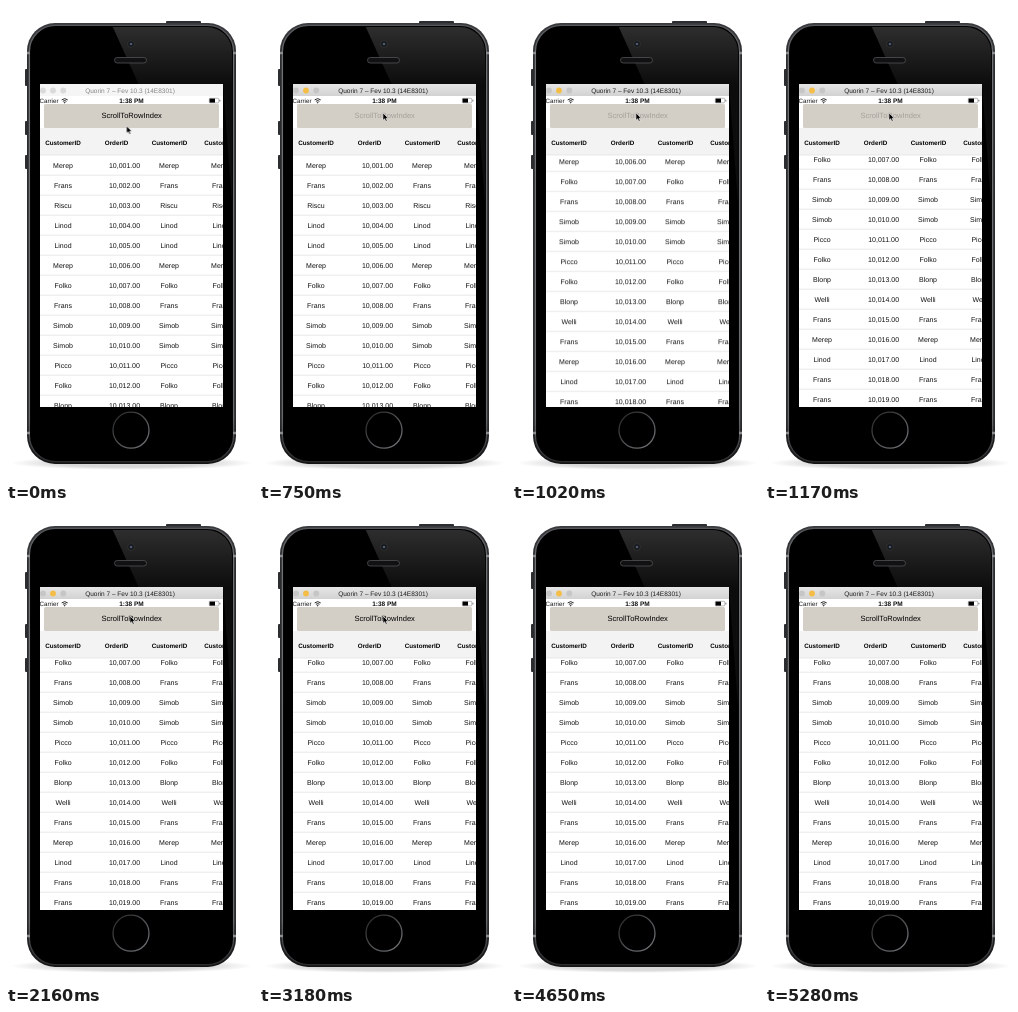
Recreate the animation shown at these times as an HTML page. Size 247x475 px, loop 5310 ms.

```html
<!DOCTYPE html>
<html lang="en">
<head>
<meta charset="utf-8">
<title>Scroll to row</title>
<style>
  html, body { margin: 0; width: 100%; height: 100%; overflow: hidden; background: #fff; }
  svg { display: block; width: 247px; height: 475px; }
  text {
    font: 7px "Liberation Sans", Arial, sans-serif;
    fill: #111; text-anchor: middle; text-rendering: geometricPrecision;
  }
  .head text { font-size: 6.3px; font-weight: bold; fill: #000; }
  .title { font-size: 6.5px; }
  .carrier { font-size: 6.2px; text-anchor: start; }
  .clock { font-size: 6.5px; font-weight: bold; }
  .label { font-size: 7.55px; }

  .rows, .cursor, .label, .idle, .active { animation: 5310ms linear infinite; }
  .rows { animation-name: scroll; }
  .cursor { animation-name: point; }
  .label { animation-name: press; animation-timing-function: step-end; }
  .idle { animation-name: idle; animation-timing-function: step-end; }
  .active { animation-name: active; animation-timing-function: step-end; }

  @keyframes scroll {
    0% { transform: translateY(0); }
    14.37% { transform: translateY(0); animation-timing-function: ease-in-out; }
    21.22%, 100% { transform: translateY(-126px); }
  }
  @keyframes point {
    0% { transform: translate(120.5px, 120px); opacity: 1; animation-timing-function: ease-in-out; }
    4.52% { transform: translate(124px, 107px); opacity: 1; animation-timing-function: step-end; }
    70.06%, 100% { transform: translate(124px, 107px); opacity: 0; }
  }
  @keyframes press {
    0%, 23.16%, 100% { fill: #000; }
    14.124% { fill: #a5a19a; }
  }
  @keyframes idle { 0% { opacity: 1; } 14.124%, 100% { opacity: 0; } }
  @keyframes active { 0% { opacity: 0; } 14.124%, 100% { opacity: 1; } }
</style>
</head>
<body>
<svg viewBox="0 0 247 475">
  <defs>
    <linearGradient id="rim" x2="0" y2="1">
      <stop offset="0" stop-color="#3a3b3e"/><stop offset=".1" stop-color="#2a2b2d"/>
      <stop offset=".9" stop-color="#2a2b2d"/><stop offset="1" stop-color="#151516"/>
    </linearGradient>
    <linearGradient id="edge" x2="0" y2="1">
      <stop offset="0" stop-color="#55575a"/><stop offset=".08" stop-color="#707276"/>
      <stop offset=".9" stop-color="#66686b"/><stop offset="1" stop-color="#2c2d2f"/>
    </linearGradient>
    <linearGradient id="gloss" x2="0" y2="1">
      <stop offset="0" stop-color="#303030"/><stop offset="1" stop-color="#0c0c0c"/>
    </linearGradient>
    <linearGradient id="ring" x2="1" y2="1">
      <stop offset="0" stop-color="#242527"/><stop offset="1" stop-color="#77797c"/>
    </linearGradient>
    <linearGradient id="bar" x2="0" y2="1">
      <stop offset="0" stop-color="#e6e6e6"/><stop offset="1" stop-color="#d2d2d2"/>
    </linearGradient>
    <radialGradient id="shadow">
      <stop offset=".6" stop-color="#000" stop-opacity=".16"/><stop offset="1" stop-color="#000" stop-opacity="0"/>
    </radialGradient>
    <clipPath id="glass"><rect x="25" y="21" width="201" height="433" rx="25"/></clipPath>
    <clipPath id="screen"><rect x="34" y="78.6" width="183" height="322.4"/></clipPath>
    <clipPath id="body"><rect x="34" y="149" width="183" height="252"/></clipPath>
  </defs>

  <ellipse cx="125.5" cy="457" rx="121" ry="7" fill="url(#shadow)"/>
  <g fill="#2b2d30">
    <rect x="160" y="15" width="35" height="3" rx="1"/>
    <rect x="19" y="63" width="3" height="17" rx="1"/>
    <rect x="19" y="115" width="3" height="14" rx="1"/>
    <rect x="19" y="149" width="3" height="14" rx="1"/>
  </g>
  <rect x="21" y="17" width="209" height="441" rx="28" fill="url(#rim)"/>
  <rect x="23.4" y="19.4" width="204.2" height="436.2" rx="26" fill="#000" stroke="url(#edge)" stroke-width="1.3"/>
  <path d="M21 47h3M227 47h3M21 427h3M227 427h3" stroke="#8b8d90" stroke-width="2.5"/>
  <g clip-path="url(#glass)">
    <path d="M105 17H230V79H133Z" fill="url(#gloss)"/>
    <path d="M217 79H230V250Z" fill="#0c0c0c"/>
  </g>
  <circle cx="125" cy="38" r="3.4" fill="#161719" stroke="#3c3e42" stroke-width=".6"/>
  <circle cx="125" cy="38" r="1.3" fill="#4d5a72"/>
  <rect x="108.5" y="51.5" width="32" height="5.5" rx="2.7" fill="#111" stroke="#505255" stroke-width=".8"/>
  <circle cx="125" cy="424.2" r="18" fill="#000" stroke="url(#ring)" stroke-width="1.3"/>

  <g clip-path="url(#screen)">
    <rect x="34" y="78" width="183" height="323" fill="#fff"/>
    <g class="idle">
      <rect x="34" y="78" width="183" height="12" fill="#f5f5f5"/>
      <g fill="#dadada"><circle cx="37" cy="84.5" r="2.9"/><circle cx="47" cy="84.5" r="2.9"/><circle cx="57.3" cy="84.5" r="2.9"/></g>
      <text class="title" x="124" y="86.6" style="fill:#858585">Quorin 7 – Fev 10.3 (14E8301)</text>
    </g>
    <g class="active">
      <rect x="34" y="78" width="183" height="12" fill="url(#bar)"/>
      <circle cx="37" cy="84.5" r="2.9" fill="#c6c6c6"/>
      <circle cx="47" cy="84.5" r="2.9" fill="#f4bd45"/>
      <circle cx="57.3" cy="84.5" r="2.9" fill="#c6c6c6"/>
      <text class="title" x="124" y="86.6" style="fill:#1c1c1c">Quorin 7 – Fev 10.3 (14E8301)</text>
    </g>

    <text class="carrier" x="33.6" y="97">Carrier</text>
    <g fill="none" stroke="#111" stroke-width=".9">
      <path d="M55.7 93.9q3-2.5 6 0M56.9 95.3q1.8-1.5 3.6 0"/>
      <circle cx="58.7" cy="96.6" r=".4"/>
    </g>
    <text class="clock" x="125.5" y="97">1:38 PM</text>
    <rect x="203.3" y="92.3" width="9.5" height="4.6" rx=".8" fill="none" stroke="#777" stroke-width=".5"/>
    <rect x="203.6" y="92.6" width="5.4" height="4" fill="#000"/>
    <rect x="213.5" y="93.8" width=".8" height="1.6" fill="#555"/>

    <g clip-path="url(#body)"><g class="rows" id="rows"></g></g>
    <g class="head">
      <rect x="34" y="122" width="183" height="27" fill="#f3f3f3"/>
      <path d="M34 149h183" stroke="#dedede" stroke-width=".7"/>
      <text x="57" y="138.7">CustomerID</text>
      <text x="110.5" y="138.7">OrderID</text>
      <text x="163.5" y="138.7">CustomerID</text>
      <text x="216" y="138.7">CustomerID</text>
    </g>
    <rect x="38" y="98" width="175" height="24" rx="1.5" fill="#d3cec6"/>
    <text class="label" x="125.7" y="112.3">ScrollToRowIndex</text>
  </g>

  <path class="cursor" d="M0 0V7.2L1.7 5.7L2.9 8.3L4.1 7.8L3 5.2H5.2Z" fill="#000" stroke="#fff" stroke-width=".5"/>
</svg>
<script>
  const names = ("Merep Frans Riscu Linod Linod Merep Folko Frans Simob Simob " +
    "Picco Folko Blonp Welli Frans Merep Linod Frans Frans").split(" ");
  const pitch = 20;
  const cell = (x, y, text) => `<text x="${x}" y="${y}">${text}</text>`;

  document.getElementById("rows").innerHTML = names.map((name, i) => {
    const top = 149.2 + i * pitch;
    const y = top + 13;
    const order = (10001 + i).toLocaleString("en-US") + ".00";
    return cell(57, y, name) + cell(118.5, y, order) + cell(163, y, name) + cell(215, y, name) +
      `<path d="M34 ${top + pitch}h183" stroke="#dedede" stroke-width=".7"/>`;
  }).join("");
</script>
</body>
</html>
```
